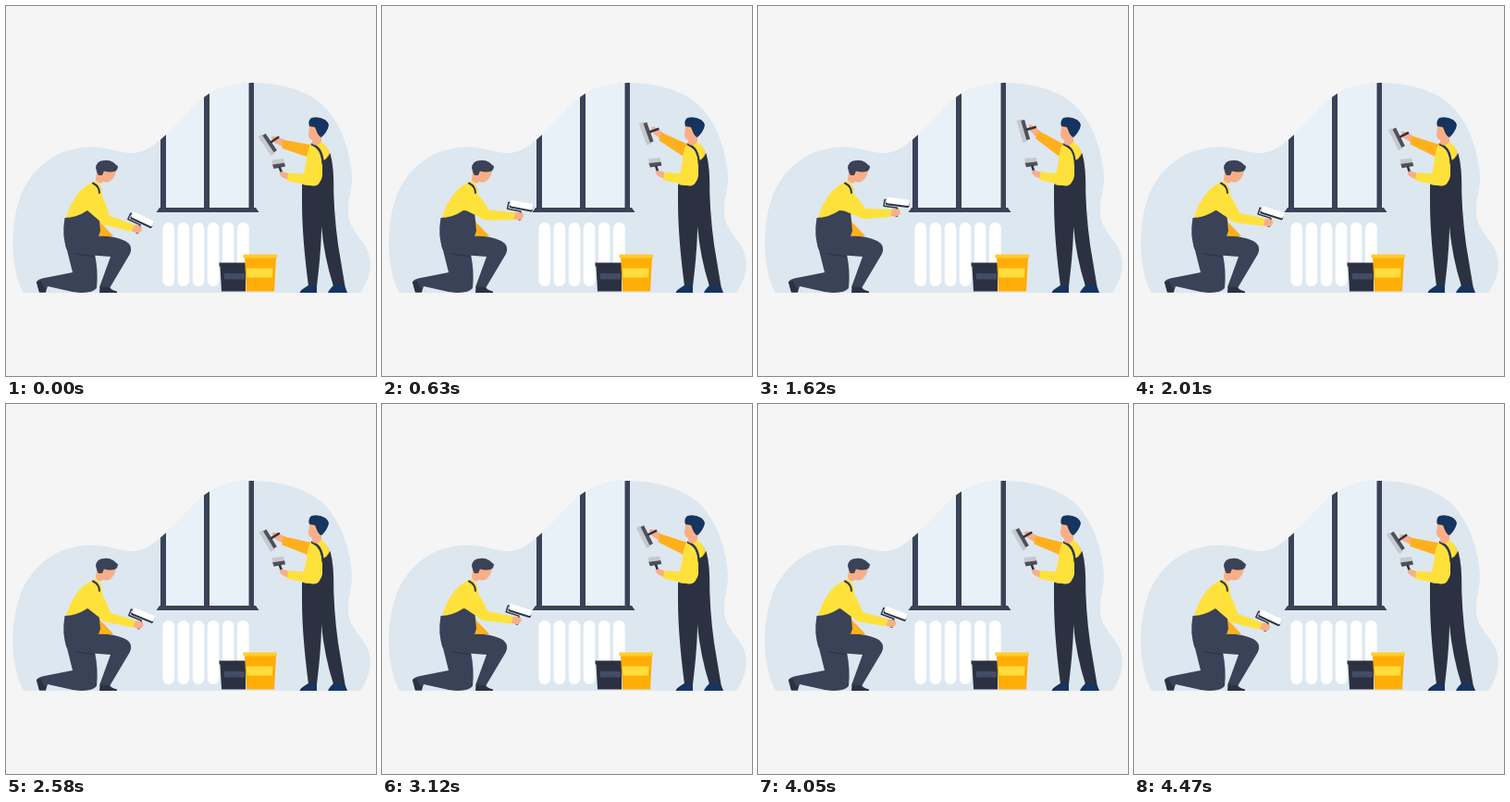
These frames come from a looping animation (400 by 400 pixels, 4500 ms). An HTML page:

```html
<!DOCTYPE html>
<html lang="en">
<head>
<meta charset="utf-8">
<title>Decorators at work</title>
<style>
  html, body { margin: 0; width: 100%; height: 100%; overflow: hidden; background: #f5f5f5; }
  svg { display: block; width: 100vw; height: 100vh; }
  .slate { fill: #3a4257; }
  .dark { fill: #2c3141; }
  .blue { fill: #15345f; }
  .yellow { fill: #ffe13c; }
  .orange { fill: #ffb01c; }
  .skin { fill: #f8ae86; }
  .white { fill: #fff; }
  .glass { fill: #e8f0f8; }
  .line { fill: none; stroke: #2f3547; stroke-linecap: round; stroke-linejoin: round; }
</style>
</head>
<body>
<svg viewBox="0 0 400 400">
  <defs>
    <clipPath id="wall">
      <path id="blob" d="M19 310C5 286 3 236 17 202C33 167 63 152 95 152.500C111 153 122 159 137 159C150 159 162 149 172 140C194 121 205 103 221 94C235 86 250 83 266 83C300 83 332 93 349 114C364 133 373 160 374 186C374 199 369 211 370 225C371 243 388 252 393 271C396 285 391 299 383 310Z"/>
    </clipPath>
  </defs>
  <use href="#blob" fill="#dde7ef"/>

  <g clip-path="url(#wall)">
    <path class="glass" d="M167 80H267V219H167Z"/>
    <path class="slate" d="M167 80h6v139h-6ZM214 80h6v139h-6ZM262.500 80h5.500v139h-5.500Z"/>
  </g>
  <path class="slate" d="M166 218H270L273.500 223H162.500Z"/>

  <g id="radiator" class="white"></g>

  <g id="buckets">
    <path class="dark" d="M230.500 277.500H259V308.500H233L231.500 281.500H230.500Z"/>
    <path fill="#424c66" d="M235.500 289H258V295.500H236Z"/>
    <path fill="#ffad08" d="M258 272H292L290 308.500H260Z"/>
    <path fill="#ffcd2b" d="M256.500 268.500h36.500v4h-36.500Z"/>
    <path fill="#ffdd3f" d="M260 283.500H288.500L288 293.500H260.500Z"/>
  </g>

  <g id="kneeler">
    <path class="orange" d="M98 223L102 234L116 248.500L107 251L95 250Z"/>
    <path class="slate" d="M65 260L72 288L44 293.500Q33 295 33 299L36 309.500H43L45 303L72 309Q92 312 98 305Q100 288 96 268Z"/>
    <path class="slate" d="M64 256Q64 266 74 268L113 271L101 304L112 305L134 268Q138 259 129 254Q116 248 98 249Z"/>
    <path d="M96 270.500Q84 270 74 267.500" fill="none" stroke="#2a3042" stroke-width="1"/>
    <path class="dark" d="M101.500 303.500L112 304Q114 307 120 308.500V310H101ZM33 298L38 297Q40 304 43 306V309.500H36Z"/>
    <path class="yellow" d="M97 189Q82 195 75 207Q67 219 64 233L66 246L98 242L101 222Q107 201 101 193Z"/>
    <path class="slate" d="M63.500 229Q76 229 88 221L100 222L102 243L99 252L94 262L66 264Q60 249 63.500 229Z"/>
    <path class="skin" d="M98 179L97 188Q101 194 105 190L106 184Z"/>
    <path class="skin" d="M100 176Q100 186 106 190Q111 192 115 187Q119 183 119 175Z"/>
    <path class="slate" d="M97 175Q98 167 106 167Q111 166 116 169Q119 172 121 173Q121 178 117 179Q112 180 106 178.500L104 183L100 183Q98 180 97 175Z"/>

    <g id="rollArm">
      <path class="line" stroke-width="1.500" d="M138 203.500H136.500V210.500H151V214"/>
      <path class="line" stroke-width="3" d="M151.500 213V219"/>
      <rect class="dark" x="138" y="201.500" width="25.500" height="7.500" rx="1.500"/>
      <rect class="white" x="138" y="200.500" width="25.500" height="6.500" rx="2"/>
      <path class="skin" d="M143 214L148 212Q155 211 155 215Q155 219 151 220L143 220.500Z"/>
      <path class="yellow" d="M83 203Q88 194 98 198Q107 204 117 215.500L145.500 213V221L120 226Q115 228 109 225L88 219Q80 212 83 203Z"/>
    </g>
    <path class="line" stroke-width="2" d="M94 191.500Q101 195 101 202"/>
  </g>

  <g id="stander">
    <g id="highArm">
      <path class="skin" d="M296 126Q295 123 299 124L304 128L308 133L303 138L297 131Z"/>
      <path class="orange" d="M306 131.500L331 149L335 160L326 163L301.500 139.500Z"/>
      <g transform="rotate(-9 291 129)">
        <path fill="#c6c9ce" d="M285.500 116.500H290.500V141.500H285.500Z"/>
        <path fill="#4f5158" d="M290 118H294V140H290Z"/>
        <path class="line" stroke-width="2.600" d="M294 129L303 129"/>
      </g>
    </g>

    <path class="dark" d="M321 190L354 186Q354 222 359 258L366.500 303H354Q344 272 341 238Q341 262 336 303H327Q320 250 320 212Z"/>
    <path class="blue" d="M327 302H336V310H317.500Q318 307 327 302ZM354 302H366L369 310H348Q349 307 354 302Z"/>
    <path class="orange" d="M338 147Q348 151 350 160L352 172L340 172Z"/>
    <path class="yellow" d="M329 150L340 147Q347 150 349 159L343 172L353 188L321 196L325 170Q325 157 329 150Z"/>
    <path class="dark" d="M342 167Q347 166 350.500 159Q355 176 354 200V212H320V193Q340 197 342 184Z"/>
    <path class="line" stroke-width="2.500" d="M331 149.500Q342 154 342.500 170"/>

    <path class="skin" d="M331 140L331 149Q336 153 341 147L341 137Z"/>
    <path class="skin" d="M328.500 128L327 138Q327 145 332 145Q338 145 340 137L339 128Z"/>
    <path class="blue" d="M328 130Q326 124 330 121Q338 119 345 123Q348 125 349 129Q347 137 341 142Q338 141 336 136L334 131Z"/>

    <g id="lowArm">
      <path fill="#c6c9ce" d="M287.500 166.500L300 165L301 169.500L288 171.500Z"/>
      <path fill="#4f5158" d="M288 171.500L301 169.500L302 173.500L289.500 176Z"/>
      <path class="line" stroke-width="2.600" d="M296 175L299 183"/>
      <path class="skin" d="M306 181L299 179Q295 179 296 182Q298 186 306 188Z"/>
      <path class="yellow" d="M326 160Q330 152 336 155Q341 161 341 172Q342 185 339 191Q336 196 329 194L304 189L305 180.500L322 181.500Z"/>
    </g>
  </g>
</svg>
<script>
const LOOP = 4500;
const $ = id => document.getElementById(id);
const NS = 'http://www.w3.org/2000/svg';

for (let i = 0; i < 6; i++) {
  const bar = document.createElementNS(NS, 'rect');
  const box = { x: 169.5 + i * 16.1, y: 234, width: 12.6, height: 69, rx: 6 };
  for (const k in box) bar.setAttribute(k, box[k]);
  $('radiator').append(bar);
}

// [time, lift]: one full stroke upward, then a shorter one
const keys = [[0, 0], [1150, 1], [2400, 0.09], [3540, 0.39], [LOOP, 0]];

function liftAt(t) {
  const i = keys.findIndex(k => k[0] > t);
  const [t0, a] = keys[i - 1], [t1, b] = keys[i];
  return a + (b - a) * (1 - Math.cos(Math.PI * (t - t0) / (t1 - t0))) / 2;
}

function turn(id, angle, x, y) {
  $(id).setAttribute('transform', `rotate(${angle.toFixed(3)} ${x} ${y})`);
}

function draw(ms) {
  const lift = liftAt(ms % LOOP);
  turn('rollArm', 25 * (1 - lift), 89, 210);
  turn('highArm', -25 * (1 - lift), 332, 154);
  turn('lowArm', 3 * lift, 336, 188);
}

const start = performance.now();
function tick() {
  draw(performance.now() - start);
  requestAnimationFrame(tick);
}
tick();
</script>
</body>
</html>
```
